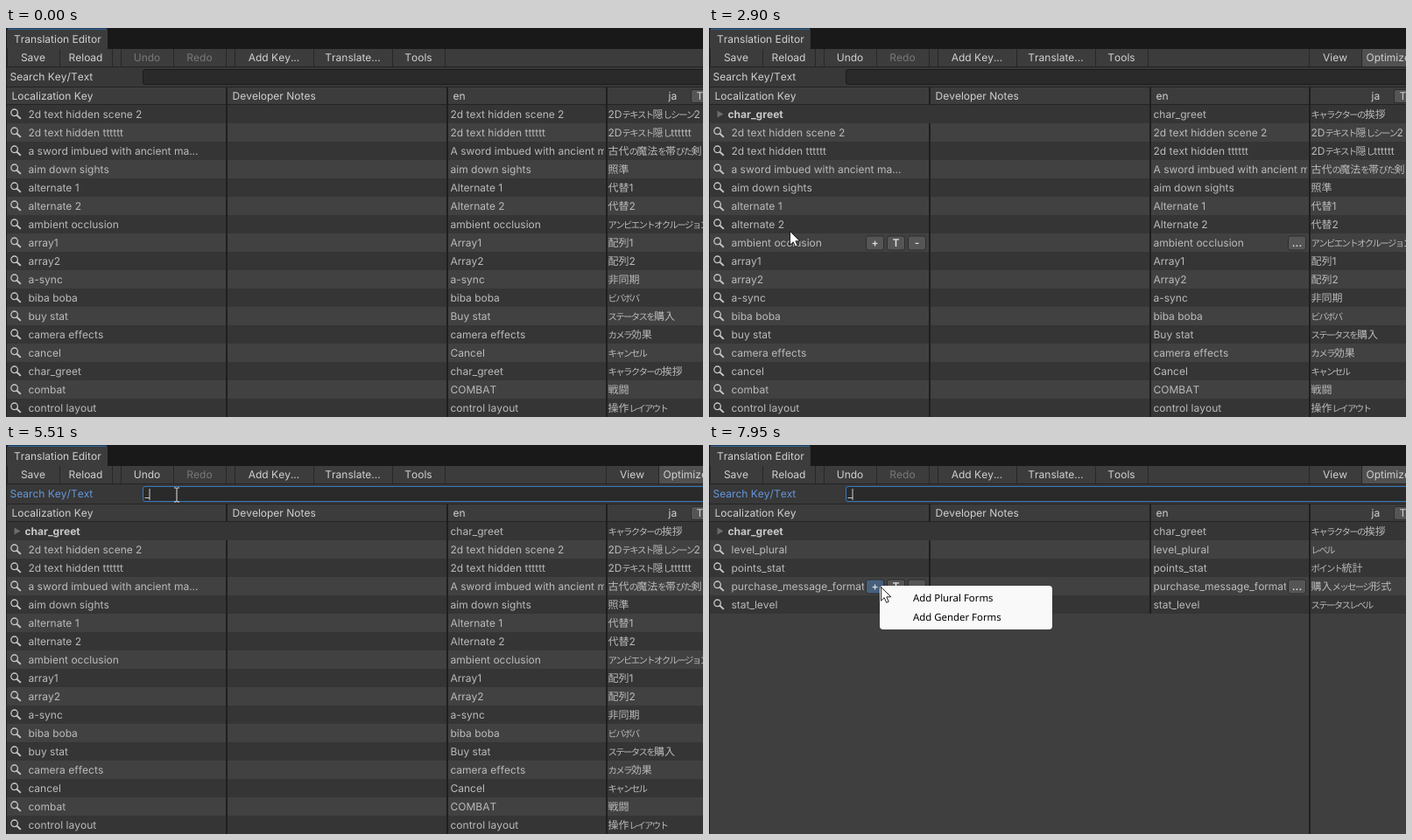
An HTML page for the animation above (8000 ms loop, 796 by 445 pixels).

```html
<!DOCTYPE html>
<html lang="en">
<head>
<meta charset="utf-8">
<title>Translation Editor</title>
<style>
html, body { margin: 0; width: 100%; height: 100%; overflow: hidden; background: #3f3f3f; }
svg { display: block; width: 796px; height: 445px; }
text {
  font: 12px Inter, "Noto Sans CJK JP", "Noto Sans CJK", sans-serif;
  font-kerning: none; text-rendering: geometricPrecision;
  fill: #bababa; white-space: pre;
}
.head { fill: #d0d0d0; }
.off { fill: #787878; }
.focus { fill: #6497dc; }
.bold { font-weight: 700; fill: #c8c8c8; }
.mid { text-anchor: middle; }
.btn { text-anchor: middle; font-weight: 600; fill: #dcdcdc; }
.kana { font-size: 10.4px; letter-spacing: -1.65px; }
.menu { font: 11.4px "Noto Sans", "Open Sans", sans-serif; fill: #000; }
</style>
</head>
<body>
<svg viewBox="0 0 796 445">
  <defs>
    <clipPath id="to177"><rect width="177" height="445"/></clipPath>
    <clipPath id="to250"><rect width="250" height="445"/></clipPath>
    <clipPath id="to659"><rect width="659" height="445"/></clipPath>
    <clipPath id="to683"><rect width="683" height="445"/></clipPath>
    <g id="lens" fill="none" stroke="#c6c6c6">
      <circle cx="9.6" cy="-1.7" r="3.8" stroke-width="1.3"/>
      <path d="M12.4 1.2L16.8 5.4" stroke-width="2"/>
    </g>
  </defs>
  <g id="ui"></g>
  <path id="arrow" d="M0.5 0.5V16.2L4.2 12.7L6.7 18.3L9.2 17.2L6.8 11.8H11.8Z" fill="#fff" stroke="#111" stroke-width="0.9"/>
  <path id="beam" d="M-3 -8H-.8L0 -7.2L.8 -8H3M0 -7V7M-3 8H-.8L0 7.2L.8 8H3" fill="none" stroke="#e4e4e4"/>
</svg>
<script>
const LOOP = 8000, TOP = 88, ROW = 21, LAG = 25;
const $ = id => document.getElementById(id);

const parse = s => s.trim().split('\n').map(line => {
  const [key, ja, en = key] = line.split('|');
  return { key, ja, en };
});

const all = parse(`
2d text hidden scene 2|2Dテキスト隠しシーン2
2d text hidden tttttt|2Dテキスト隠しtttttt
a sword imbued with ancient ma...|古代の魔法を帯びた剣|A sword imbued with ancient magic
aim down sights|照準
alternate 1|代替1|Alternate 1
alternate 2|代替2|Alternate 2
ambient occlusion|アンビエントオクルージョン
array1|配列1|Array1
array2|配列2|Array2
a-sync|非同期
biba boba|ビバボバ
buy stat|ステータスを購入|Buy stat
camera effects|カメラ効果
cancel|キャンセル|Cancel
char_greet|キャラクターの挨拶
combat|戦闘|COMBAT
control layout|操作レイアウト`);
const found = parse(`
level_plural|レベル
points_stat|ポイント統計
purchase_message_format|購入メッセージ形式
stat_level|ステータスレベル`);

const greet = all.find(r => r.key === 'char_greet');
const group = { ...greet, group: true };
const forms = ['Masculine', 'Feminine'].map(key => ({ ...greet, key, child: true }));
const rest = all.filter(r => r !== greet);

// Pointer path: time, x, y
const path = [
  [150, 160, 432], [350, 135, 375], [470, 125, 348], [620, 127, 383],
  [920, 177, 397], [1120, 191, 398], [1680, 191, 398], [2030, 249, 429],
  [2280, 252, 434], [2450, 252, 434], [2900, 92, 232], [3170, 15, 96],
  [3290, 15, 96], [3340, 11, 97], [3490, 11, 97], [3690, 14, 101],
  [4100, 14, 101], [4430, 162, 72], [4650, 195, 57], [6170, 195, 57],
  [6530, 44, 184], [6930, 158, 171], [7750, 196, 162], [8000, 196, 162]
];

const slope = (i, k) => (path[i + 1][k] - path[i][k]) / (path[i + 1][0] - path[i][0]);
function tangent(i, k) {
  if (i === 0 || i === path.length - 1) return 0;
  const a = slope(i - 1, k), b = slope(i, k);
  return a * b <= 0 ? 0 : 2 * a * b / (a + b);
}
function pointer(t) {
  if (t <= path[0][0]) return path[0].slice(1);
  let i = 0;
  while (i < path.length - 2 && path[i + 1][0] < t) i++;
  const h = path[i + 1][0] - path[i][0], u = (t - path[i][0]) / h, v = 1 - u;
  return [1, 2].map(k =>
    path[i][k] * v * v * (1 + 2 * u) + path[i + 1][k] * u * u * (3 - 2 * u) +
    h * u * v * (v * tangent(i, k) - u * tangent(i + 1, k)));
}

const text = (x, y, s, cls = '', extra = '') =>
  `<text x="${x}" y="${y + 4.4}" class="${cls}" ${extra}>${s}</text>`;
const rect = (x, y, w, h, fill, extra = '') =>
  `<rect x="${x}" y="${y}" width="${w}" height="${h}" fill="${fill}" ${extra}/>`;
const clip = x => `clip-path="url(#to${x})"`;
const kana = s => s.replace(/[\u3040-\u30ff]+/g, m => `<tspan class="kana">${m}</tspan>`);
const button = (x, y, s, on) =>
  rect(x + .5, y - 7.5, 20, 16, on ? '#46607c' : '#555', 'rx="2.5" stroke="#2c2c2c"') +
  text(x + 10.5, y, s, 'btn');

function toolbar(edited) {
  const items = [['Save', 1, 60], ['Reload', 61, 60], ['Undo', 131, 60, !edited], ['Redo', 191, 60, true],
    ['Add Key...', 261, 90], ['Translate...', 351, 90], ['Tools', 441, 60]];
  if (edited) items.push(['View', 685, 60]);
  let s = rect(0, 0, 796, 24, '#191919') + rect(1, 1, 115, 24, '#3c3c3c', 'rx="2"') +
    rect(2, 0.5, 113, 1.5, '#2f618f') + text(9, 13, 'Translation Editor', 'head') +
    rect(1, 24, 795, 20, '#3c3c3c');
  for (const [label, x, w, off] of items)
    s += rect(x, 24, 1, 20, '#272727') + rect(x + w, 24, 1, 20, '#272727') +
      text(x + w / 2, 34, label, off ? 'mid off' : 'mid head');
  if (edited) s += rect(746, 24, 50, 20, '#505050') + text(750.5, 34, 'Optimized', 'head');
  return s + rect(0, 44, 796, 1, '#232323');
}

function search(focus, query) {
  return rect(1, 45, 795, 22, '#383838') + text(4.5, 56, 'Search Key/Text', focus ? 'focus' : 'head') +
    rect(156.5, 47.5, 650, 17, '#2a2a2a', `rx="2.5" stroke="${focus ? '#3a79bb' : '#1b1b1b'}"`) +
    text(158.5, 56, query, 'head') +
    (focus ? rect(query ? 163.5 : 159, 50, 1, 13, '#d0d0d0') : '');
}

function header() {
  return rect(0, 67, 796, 1, '#232323') + rect(1, 68, 795, 19, '#3c3c3c') + rect(0, 87, 796, 1, '#232323') +
    text(6.5, 78, 'Localization Key', 'head') + text(258.5, 78, 'Developer Notes', 'head') +
    text(510.5, 78, 'en', 'head') + text(756.5, 78, 'ja', 'head') +
    rect(782.5, 70.5, 24, 15, '#555', 'rx="2.5" stroke="#2c2c2c"') + text(788.5, 78, 'T', 'head');
}

function row(r, i, hover, pressed) {
  const y = TOP + i * ROW, c = y + 10.5, x = r.child ? 14 : 0;
  let s = rect(1, y, 795, ROW, i % 2 ? '#414141' : '#353535');
  if (r.group) {
    s += `<path d="${r.open ? `M8.5 ${c - 3}h8l-4 7z` : `M9.5 ${c - 4}v8l7-4z`}" fill="#6c6c6c"/>` +
      text(21.5, c, r.key, 'bold');
  } else {
    s += `<use href="#lens" x="${x}" y="${c}"/>` + text(25.5 + x, c, r.key, '', clip(hover ? 177 : 250)) +
      rect(251, y, 2, ROW, '#1f1f1f');
  }
  s += rect(503, y, 2, ROW, '#1f1f1f') + text(507.5, c, r.en, '', clip(hover ? 659 : 683)) + text(687.5, c, kana(r.ja));
  if (hover)
    s += button(179, c, '+', pressed) + button(203, c, 'T') + button(227, c, '-') + button(661, c, '...');
  return s;
}

function menu([x, y], [, py]) {
  const d = py - y;
  let s = rect(x, y, 197, 50, '#f9f9f9', 'rx="4"');
  if (d > 3) s += rect(x + 4, y + (d > 25 ? 25 : 3), 189, 22, '#f0f0f0', 'rx="3"');
  return s + text(x + 38, y + 14, 'Add Plural Forms', 'menu') + text(x + 38, y + 36, 'Add Gender Forms', 'menu');
}

function rowsAt(t) {
  if (t < 2450) return all;
  if (t >= 5910) return [group, ...found];
  if (t >= 3490 && t < 4130) return [{ ...group, open: true }, ...forms, ...rest];
  return [group, ...rest];
}

let last = '';
function draw(t) {
  const pos = pointer(t), rows = rowsAt(t).slice(0, 17), edited = t >= 2450;
  const pressed = t >= 1270 && t < 2450 || t >= 7850;
  // Row hover trails the pointer slightly
  let hover = t < 200 ? -1 : Math.floor((pointer(t - LAG)[1] - TOP) / ROW);
  if (t >= 920 && t < 2450) hover = 14;
  if (t >= 7750) hover = 3;

  let s = rect(0, 0, 796, 445, '#3f3f3f') + toolbar(edited) +
    search(t >= 4650, t >= 5510 ? '_' : '') + header();
  rows.forEach((r, i) => s += row(r, i, i === hover && !r.group, pressed));
  s += rect(251, 68, 2, 20, '#1f1f1f') + rect(503, 68, 2, 20, '#1f1f1f') +
    rect(685, 68, 2, 377, '#1f1f1f') + rect(0, 24, 1, 421, '#1c1c1c');
  if (t >= 1320 && t < 2450) s += menu([192, 397], pos);
  if (t >= 7900) s += menu([195, 161], pos);
  if (s !== last) $('ui').innerHTML = last = s;

  const typing = pos[0] > 156 && pos[1] > 46 && pos[1] < 66;
  const place = `translate(${pos.map(Math.round)})`;
  $('arrow').setAttribute('transform', place);
  $('beam').setAttribute('transform', place);
  $('arrow').style.display = t < 150 || typing ? 'none' : '';
  $('beam').style.display = typing ? '' : 'none';
}

const start = performance.now();
function tick() {
  draw((performance.now() - start) % LOOP);
  requestAnimationFrame(tick);
}
tick();
</script>
</body>
</html>
```
